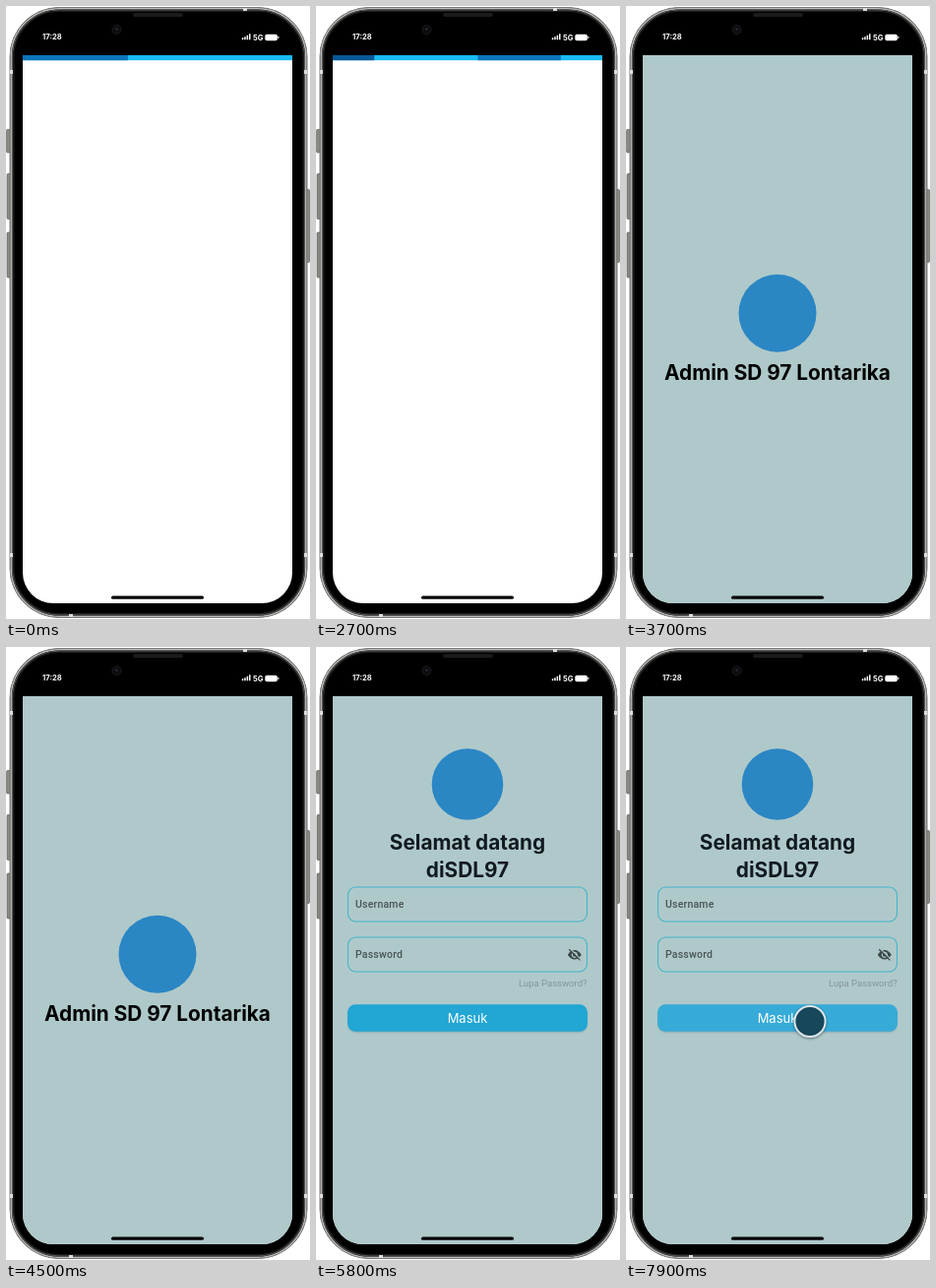
Recreate the animation shown at these times as an HTML page. Size 309 by 623 pixels, loop 8000 ms.

```html
<!DOCTYPE html>
<html lang="id">
<head>
<meta charset="utf-8">
<title>App start</title>
<style>
  html, body { margin: 0; width: 100%; height: 100%; overflow: hidden; background: #fff; }
  svg { display: block; width: 309px; height: 623px; }
  text { font-family: Inter, sans-serif; }
  .roboto { font-family: Roboto, sans-serif; }
  .mid { text-anchor: middle; }
  .bold { font-weight: 700; }
  .field { fill: none; stroke: #45b4cc; stroke-width: 1.1; }
  .label { font-size: 10.5px; font-weight: 500; letter-spacing: .2px; fill: #4a5455; }
</style>
</head>
<body>
<svg viewBox="0 0 309 623">
  <defs>
    <clipPath id="screen"><path d="M17 50H291V576a31 31 0 0 1-31 31H48a31 31 0 0 1-31-31Z"/></clipPath>
    <filter id="soft" x="-20%" y="-40%" width="140%" height="200%"><feGaussianBlur stdDeviation="1.3"/></filter>
  </defs>

  <!-- phone -->
  <g fill="#8b8b84" stroke="#4a4a47" stroke-width=".6">
    <rect x=".6" y="125.500" width="4" height="23.500" rx="1"/>
    <rect x="1" y="170.500" width="4" height="46" rx="1"/>
    <rect x="1" y="230" width="4" height="46" rx="1"/>
    <rect x="304.500" y="186.500" width="4" height="74" rx="1"/>
  </g>
  <g fill="none">
    <rect x="4" y="1.500" width="302" height="620" rx="50" fill="#000" stroke="#777775"/>
    <rect x="5.200" y="2.700" width="299.600" height="617.600" rx="49" stroke="#bcbcba" stroke-width="1.500"/>
    <rect x="6.600" y="4.100" width="296.800" height="614.800" rx="47.500" stroke="#555553" stroke-width="1.300"/>
    <rect x="7.900" y="5.400" width="294.200" height="612.200" rx="46.200" stroke="#1d1d1c" stroke-width="1.300"/>
  </g>
  <path d="M4 65h3v4H4zM303 65h3v4h-3zM4 556h3v4H4zM303 556h3v4h-3zM64 618h4v3h-4zM241 2h4v3h-4z" fill="#dcdcda"/>
  <rect x="129" y="7" width="51" height="4" rx="2" fill="#1b1b1c"/>
  <circle cx="112.500" cy="24" r="4.500" fill="#0c0c0f" stroke="#1c1c20"/>
  <circle cx="112.500" cy="23.500" r="1.300" fill="#292936"/>

  <!-- status bar -->
  <g fill="#fff">
    <text class="bold" x="37" y="34" font-size="7.600">17:28</text>
    <text class="bold" x="251" y="34.800" font-size="7.600">5G</text>
    <path d="M239.800 32.200h1.500v2h-1.500zM242.200 31.200h1.500v3h-1.500zM244.600 29.800h1.500v4.400h-1.500zM247 28.300h1.500v5.900H247z"/>
    <rect x="263.300" y="28.700" width="12.500" height="6.600" rx="1.800"/>
    <rect x="276.300" y="30.800" width="1" height="2.400" rx=".5"/>
  </g>

  <g clip-path="url(#screen)">
    <rect x="17" y="49" width="274" height="559" fill="#fff"/>

    <g id="loader">
      <rect x="17" y="50" width="274" height="5.200" fill="#18bbf4"/>
      <rect id="barA" y="50" height="5.200" fill="#0b75b8"/>
      <rect id="barB" y="50" height="5.200" fill="#085796"/>
    </g>

    <g id="splash">
      <rect x="17" y="49" width="274" height="559" fill="#afc9ca"/>
      <text id="plain" class="roboto mid" x="154" y="338.500" font-size="20" font-weight="500">Admin SD 97 Lontarika</text>
      <g id="brand">
        <circle cx="154" cy="312.300" r="39.500" fill="#2b86c4"/>
        <text class="mid bold" x="154" y="380" font-size="20.800">Admin SD 97 Lontarika</text>
      </g>
    </g>

    <g id="login">
      <rect x="17" y="49" width="274" height="559" fill="#afc9ca"/>
      <circle cx="154" cy="139.500" r="36.300" fill="#2b86c4"/>
      <g class="mid bold" font-size="20.800" fill="#111a20">
        <text x="154" y="206">Selamat datang</text>
        <text x="154" y="234">diSDL97</text>
      </g>
      <rect class="field" x="32.500" y="244" width="243" height="35" rx="8"/>
      <rect class="field" x="32.500" y="295" width="243" height="35" rx="8"/>
      <text class="roboto label" x="40" y="265">Username</text>
      <text class="roboto label" x="40" y="316">Password</text>
      <g transform="translate(262.800 312.800)">
        <path d="M-7 0Q-4 -4.800 0 -4.800T7 0Q4 4.800 0 4.800T-7 0Z" fill="#3c4749"/>
        <circle r="2.500" fill="#3c4749" stroke="#afc9ca" stroke-width="1.200"/>
        <path d="M-4.700 -6.400L6.500 4.800" stroke="#afc9ca" stroke-width="1.300"/>
        <path d="M-5.600 -5.600L5.600 5.600" stroke="#3c4749" stroke-width="1.300"/>
      </g>
      <text class="roboto" x="275.500" y="345.300" font-size="9.500" fill="#84949f" text-anchor="end">Lupa Password?</text>
      <rect x="33" y="365" width="242" height="26.500" rx="8" fill="#45656c" opacity=".4" filter="url(#soft)"/>
      <rect id="button" x="32" y="363.300" width="244" height="27.500" rx="8"/>
      <text class="mid" x="154" y="382" font-size="13" fill="#fff">Masuk</text>
    </g>

    <rect x="107" y="599.500" width="94" height="3.300" rx="1.650" fill="#050505"/>
  </g>

  <g id="pointer">
    <circle cy="1" r="17" fill="#123" opacity=".4" filter="url(#soft)"/>
    <circle r="15.600" fill="#17475b" stroke="#dce6e9" stroke-width="2"/>
  </g>
</svg>

<script>
const LOOP = 8000, TICK = 100, LEFT = 17, WIDTH = 274;
const $ = id => document.getElementById(id);
const show = (id, on) => $(id).setAttribute('display', on ? 'inline' : 'none');
const move = (id, x, y = 0) => $(id).setAttribute('transform', `translate(${x} ${y})`);
const part = (t, from, to) => Math.min(1, Math.max(0, (t - from) / (to - from)));

// Cubic Bezier easing, solved by bisection
function bezier(x1, y1, x2, y2) {
  const at = (a, b, s) => 3 * a * s * (1 - s) ** 2 + 3 * b * s * s * (1 - s) + s ** 3;
  return x => {
    let lo = 0, hi = 1;
    for (let i = 0; i < 24; i++) {
      const mid = (lo + hi) / 2;
      if (at(x1, x2, mid) < x) lo = mid; else hi = mid;
    }
    return at(y1, y2, lo);
  };
}
const easeOut = bezier(0, 0, .58, 1);
const easeIn = bezier(.42, 0, 1, 1);
const slide = bezier(.2, .7, .2, 1);
const glide = bezier(.3, 0, .3, 1);

// The loader stalls while the app is busy
function stalled(t) {
  if (t < 300) return 0;
  if (t < 1700) return t;
  return t < 2000 ? 1700 : t < 2700 ? 2000 : 2700;
}

function bar(id, start, p) {
  const left = start + (1 - start) * p;
  $(id).setAttribute('x', LEFT + WIDTH * left);
  $(id).setAttribute('width', WIDTH * (1 - .9 * p));
}

function draw(t) {
  const phase = (stalled(t) + 466) % 2000 / 2000;
  bar('barA', -1, easeOut(phase));
  bar('barB', -1.5, easeIn(phase));

  show('loader', t < 3100);
  show('splash', t >= 3100 && t < 5600);
  show('plain', t < 3400);
  show('brand', t >= 3400);

  const s = slide(part(t, 4900, 5400));
  show('login', t >= 5000);
  move('splash', t < 5000 ? 0 : -WIDTH / 3 * s);
  move('login', WIDTH * (1 - s));

  const g = glide(part(t, 7300, 7800));
  const y = 560 - 179.500 * g;
  show('pointer', t >= 7400);
  move('pointer', 258 - 71 * g, y);
  $('button').setAttribute('fill', t >= 7400 && y < 391 ? '#37abd7' : '#22a6d4');
}

const begin = performance.now();
function frame() {
  const t = (performance.now() - begin) % LOOP;
  draw(Math.floor(t / TICK) * TICK);
  requestAnimationFrame(frame);
}
frame();
</script>
</body>
</html>
```
